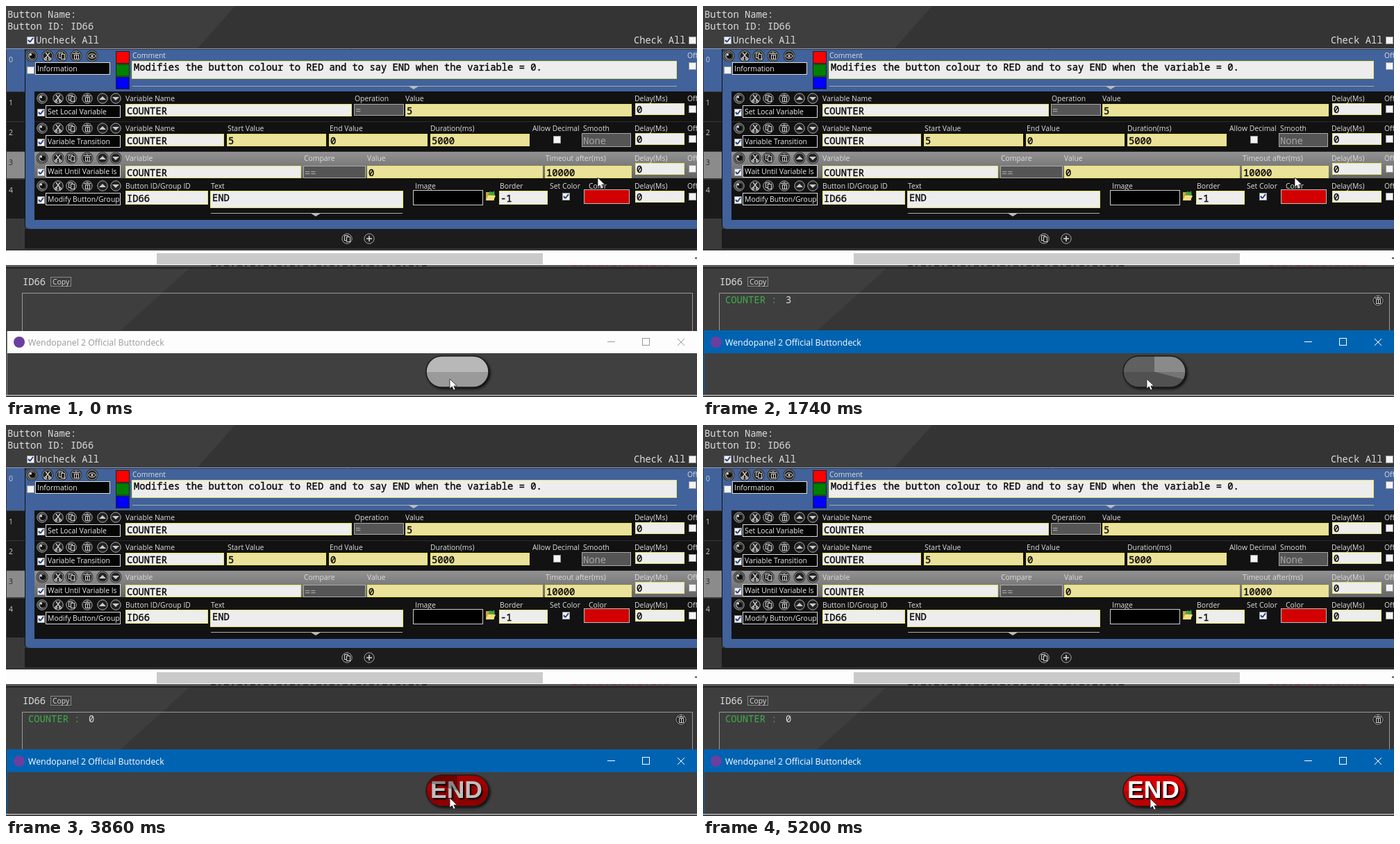
An HTML page with a canvas that plays this animation: 995x563 px, repeating every 5300 ms.

```html
<!DOCTYPE html>
<html lang="en">
<head>
<meta charset="utf-8">
<title>Counter button</title>
<style>
html, body { margin: 0; width: 100%; height: 100%; overflow: hidden; background: #3c3c3c; }
canvas { display: block; }
</style>
</head>
<body>
<canvas id="stage" width="995" height="563"></canvas>
<script>
const c = document.getElementById('stage').getContext('2d');
const LOOP = 5300, PRESS = 370, ZERO = 3700, SHRINK = 4430;
const MONO = '13.8px "Noto Sans Mono", monospace';
const SANS = '10.4px "Open Sans", sans-serif';
const WHITE = '#ededed', YELLOW = '#ebe29a', GREY = '#555';
const clamp = v => Math.max(0, Math.min(1, v));

function rect(x, y, w, h, fill, border) {
  c.fillStyle = fill;
  c.fillRect(x, y, w, h);
  if (border) {
    c.strokeStyle = border;
    c.lineWidth = 1;
    c.strokeRect(x + .5, y + .5, w - 1, h - 1);
  }
}

function poly(points, fill) {
  c.beginPath();
  for (let i = 0; i < points.length; i += 2) c.lineTo(points[i], points[i + 1]);
  c.closePath();
  c.fillStyle = fill;
  c.fill();
}

function disc(x, y, r, fill, border) {
  c.beginPath();
  c.arc(x, y, r, 0, 7);
  c.fillStyle = fill;
  c.fill();
  if (border) {
    c.strokeStyle = border;
    c.lineWidth = 1;
    c.stroke();
  }
}

function lines(color, width, ...segments) {
  c.strokeStyle = color;
  c.lineWidth = width;
  c.beginPath();
  for (const [x1, y1, x2, y2] of segments) {
    c.moveTo(x1, y1);
    c.lineTo(x2, y2);
  }
  c.stroke();
}

function text(s, x, y, font = SANS, color = '#ddd') {
  c.font = font;
  c.fillStyle = color;
  c.fillText(s, x, y);
}

// Dark text on light fields is slightly heavier than the labels.
function entry(s, x, y) {
  text(s, x, y, MONO, '#0a0a0a');
  c.strokeStyle = '#0a0a0a';
  c.lineWidth = .4;
  c.strokeText(s, x, y);
}

function field(x, y, right, bottom, fill, value = '') {
  const dim = fill === GREY, baseline = (y + bottom) / 2 + 5.5;
  rect(x, y, right - x, bottom - y, fill, dim ? '#aaa' : '#e6e36c');
  if (dim) text(value, x + 2, baseline, MONO, '#a5a5a5');
  else entry(value, x + 2, baseline);
}

function nameBox(s, x, y) {
  rect(x, y, 108, 18, '#050505', '#ddd');
  text(s, x + 3, y + 12.5, SANS, '#eee');
}

function check(x, y, on) {
  rect(x - 5, y - 5, 11, 11, '#f4f4f4', '#999');
  if (on) lines('#26418f', 2, [x - 3, y, x - .5, y + 3], [x - .5, y + 3, x + 4, y - 3]);
}

const glyphs = {
  dot() {
    disc(0, 0, 5.5, '#888');
    disc(1, 0, 4, '#111');
    disc(-1.5, -2, 1.5, '#eee');
  },
  cut() {
    lines('#ccc', 1.3, [-3, -5, 3, 3], [3, -5, -3, 3]);
    c.beginPath(); c.arc(-3, 4, 1.5, 0, 7); c.moveTo(4.5, 4); c.arc(3, 4, 1.5, 0, 7); c.stroke();
  },
  copy() {
    rect(-4, -5, 6, 8, '#222', '#ccc');
    rect(-1, -3, 6, 8, '#222', '#ccc');
  },
  bin() {
    rect(-3, -2, 7, 7, '#222', '#ccc');
    lines('#ccc', 1, [-5, -3.5, 5, -3.5], [-1.5, -5, 1.5, -5], [.5, -1, .5, 4]);
  },
  up() { poly([-5, 2, 0, -3, 5, 2], '#ccc'); },
  down() { poly([-5, -2, 0, 3, 5, -2], '#ccc'); },
  eye() {
    c.strokeStyle = '#ddd';
    c.beginPath(); c.ellipse(0, 0, 5, 3, 0, 0, 7); c.stroke();
    disc(0, 0, 1.5, '#ddd');
  },
  plus() { lines('#ddd', 1.5, [-4, 0, 4, 0], [0, -4, 0, 4]); }
};

function icon(kind, x, y) {
  c.save();
  c.translate(x, y);
  disc(0, 0, 8.5, '#151515');
  disc(0, 0, 7.2, '#222', '#aaa');
  glyphs[kind]();
  c.restore();
}

function cursor(x, y) {
  c.save();
  c.translate(x, y);
  poly([0, 0, 0, 14, 3.3, 11, 5.5, 16, 8, 15, 5.8, 10.2, 10.3, 10], '#fff');
  c.strokeStyle = '#222';
  c.lineWidth = .8;
  c.stroke();
  c.restore();
}

function handle(x, right, y) {
  lines('#aaa', 1, [x, y + .5, right, y + .5]);
  const mid = (x + right) / 2 + 13;
  poly([mid - 8, y, mid + 8, y, mid, y + 5], '#bbb');
}

function actionRow(name, y, boxY, labels, delayY) {
  ['dot', 'cut', 'copy', 'bin', 'up', 'down'].forEach((kind, i) =>
    icon(kind, [52, 75, 94, 117, 139, 158][i], y));
  check(50, boxY + 10, true);
  nameBox(name, 57, boxY);
  for (const [s, x] of [...labels, ['Delay(Ms)', 905], ['Off', 981]]) text(s, x, y + 4);
  field(906, delayY, 977, delayY + 17, WHITE, '0');
  check(988, delayY + 8);
}

function editor() {
  rect(0, 0, 995, 376, '#343434');
  poly([0, 0, 330, 0, 275, 62, 0, 62], '#3e3e3e');
  text('Button Name:', 2, 17, MONO);
  text('Button ID: ID66', 2, 34, MONO);
  check(35, 49, true);
  text('Uncheck All', 43, 54, MONO);
  text('Check All', 904, 54, MONO);
  check(988, 49);

  rect(0, 62, 27, 288, '#3a3a3a');
  const rows = [[62, 61, '#41629b'], [124, 42, '#1b1b1b'], [167, 42, '#1b1b1b'], [210, 38, '#8b8b8b'], [250, 56, '#1b1b1b']];
  rows.forEach(([y, h, fill], i) => {
    rect(1, y, 26, h, fill);
    text(i, 4, y + 18.5, SANS, i === 3 ? '#222' : '#ccc');
  });
  rect(27, 321, 968, 28, '#1c1c1c');
  c.fillStyle = '#41629b';
  c.beginPath();
  c.roundRect(27, 63, 990, 258, 8);
  c.fill();
  lines('#8b9dbb', 1, [0, 61.5, 995, 61.5]);
  lines('#111', 1, [27.5, 62, 27.5, 318]);
  rect(41, 123, 954, 185, '#121212');
  const band = c.createLinearGradient(0, 210, 0, 248);
  band.addColorStop(0, '#929292');
  band.addColorStop(1, '#656565');
  rect(41, 210, 954, 38, band);
  lines('#2b2b2b', 1, [41, 166.5, 995, 166.5], [41, 209.5, 995, 209.5]);

  ['dot', 'cut', 'copy', 'bin', 'eye'].forEach((kind, i) => icon(kind, [37, 60, 80, 101, 124][i], 72));
  check(35, 92);
  nameBox('Information', 42, 81);
  ['#f00', '#008000', '#00f'].forEach((color, i) => rect(158, 65 + i * 18.5, 20, 18, color, '#222'));
  text('Comment', 182, 75);
  text('Off', 981, 75);
  check(988, 86);
  field(181, 79, 966, 105, WHITE);
  entry('Modifies the button colour to RED and to say END when the variable = 0.', 184, 93);
  handle(182, 966, 115);

  actionRow('Set Local Variable', 133, 143, [['Variable Name', 172], ['Operation', 502], ['Value', 575]], 140);
  field(172, 141, 498, 159, WHITE, 'COUNTER');
  field(501, 141, 573, 158, GREY, '=');
  field(575, 141, 901, 159, YELLOW, '5');

  actionRow('Variable Transition', 176, 186, [['Variable Name', 172], ['Start Value', 319], ['End Value', 466],
    ['Duration(ms)', 611], ['Allow Decimal', 758], ['Smooth', 831]], 183);
  field(172, 184, 314, 202, WHITE, 'COUNTER');
  field(318, 184, 461, 202, YELLOW, '5');
  field(465, 184, 607, 202, YELLOW, '0');
  field(611, 184, 754, 202, YELLOW, '5000');
  check(793, 192);
  field(829, 183, 900, 203, GREY, 'None');

  actionRow('Wait Until Variable Is', 219, 229, [['Variable', 172], ['Compare', 429], ['Value', 520],
    ['Timeout after(ms)', 777]], 226);
  field(172, 230, 425, 248, WHITE, 'COUNTER');
  field(428, 230, 518, 248, GREY, '==');
  field(520, 230, 773, 248, YELLOW, '0');
  field(776, 230, 901, 248, YELLOW, '10000');

  actionRow('Modify Button/Group', 259, 269, [['Button ID/Group ID', 172], ['Text', 295], ['Image', 589],
    ['Border', 711], ['Set Color', 783], ['Color', 839]], 266);
  field(172, 266, 291, 286, WHITE, 'ID66');
  field(294, 266, 572, 291, WHITE);
  entry('END', 297, 281);
  rect(586, 265, 101, 22, '#000', '#ccc');
  poly([691, 268, 696, 268, 698, 270, 703, 270, 703, 280, 691, 280], '#c8a83c');
  poly([694, 273, 705, 273, 702, 280, 691, 280], '#f1e07a');
  poly([694, 272, 697, 267, 701, 268, 703, 266, 704, 273, 698, 272], '#43a047');
  field(710, 266, 780, 286, WHITE, '-1');
  check(806, 274, true);
  rect(832, 264, 66, 21, '#d20000', '#bbb');
  handle(295, 571, 298);

  icon('copy', 491, 335);
  icon('plus', 523, 335);
  rect(0, 352, 995, 21, '#fdfdfd');
  rect(217, 356, 556, 16, '#cacaca');
  rect(992, 362, 3, 2, '#555');
}

function variables(t) {
  rect(0, 373, 995, 190, '#363636');
  poly([0, 378, 264, 378, 165, 467, 0, 467], '#3e3e3e');
  rect(0, 373, 995, 3, '#555');
  c.setLineDash([7, 4, 3, 5]);
  lines('#262626', 2, [295, 374, 610, 374]);
  lines('#6b3848', 2, [815, 374, 955, 374]);
  c.setLineDash([]);
  rect(0, 376, 995, 2, '#222');
  text('ID66', 24, 402, MONO);
  rect(64, 390, 30, 14, '#3c3c3c', '#888');
  text('Copy', 67, 401);
  rect(23, 413, 966, 60, 'transparent', '#999');
  if (t >= PRESS) {
    const value = Math.ceil(5 * clamp((ZERO - t) / (ZERO - PRESS)));
    text('COUNTER :', 32, 428, MONO, '#3fae49');
    text(value, 119, 428, MONO, '#ddd');
    icon('bin', 972, 424);
  }
}

function buttonShape() {
  c.beginPath();
  c.roundRect(605, 504, 90, 45, 22.5);
}

function deckButton(t) {
  const ended = t >= ZERO;
  c.save();
  c.shadowColor = '#000';
  c.shadowBlur = 4;
  c.shadowOffsetX = c.shadowOffsetY = 2;
  buttonShape();
  c.fillStyle = '#222';
  c.fill();
  c.restore();

  c.save();
  buttonShape();
  c.clip();
  rect(605, 504, 90, 23, ended ? '#d80000' : '#b8b8b8');
  rect(605, 527, 90, 23, ended ? '#bd0000' : '#9a9a9a');
  if (ended) {
    c.save();
    c.shadowColor = '#000';
    c.shadowBlur = 2;
    c.shadowOffsetX = c.shadowOffsetY = 2;
    text('END', 611, 537, 'bold 35.5px "Liberation Sans", Arial, sans-serif', '#fff');
    c.restore();
  }
  if (t >= PRESS && t < SHRINK + 150) {
    // Cooldown shade: a sweeping dark wedge that finally collapses to the centre.
    const size = 1 - clamp((t - SHRINK) / 150);
    const swept = clamp((t - PRESS) / 4200) * Math.PI * 2;
    c.translate(650, 526.5);
    c.scale(46 * size, 23 * size);
    const radius = size < 1 ? 1 : 1.5;
    disc(0, 0, radius, 'rgba(0,0,0,.25)');
    c.fillStyle = 'rgba(0,0,0,.3)';
    c.beginPath();
    c.moveTo(0, 0);
    c.arc(0, 0, radius, swept - Math.PI / 2, Math.PI * 1.5);
    c.fill();
  }
  c.restore();
  buttonShape();
  c.strokeStyle = '#1d1d1d';
  c.lineWidth = 1.5;
  c.stroke();
}

function deckWindow(t) {
  const active = t >= PRESS, ink = active ? '#fff' : '#999';
  const top = active ? 467 : 468;
  rect(1, top, 994, 96, active ? '#0063b1' : '#888');
  rect(2, top, 993, 500 - top, active ? '#0063b1' : '#fdfdfd');
  rect(2, 500, 993, 60, '#404040');
  rect(0, 560, 995, 1, '#ddd');
  rect(0, 561, 995, 2, '#444');
  disc(19, 484, 8, '#6b3fa0');
  text('Wendopanel 2 Official Buttondeck', 32, 488.5, '12.35px "Open Sans", sans-serif', ink);
  lines(ink, 1, [866, 483.5, 877, 483.5], [967, 479, 977, 489], [977, 479, 967, 489]);
  c.strokeRect(916.5, 478.5, 10, 10);
  deckButton(t);
  const nudge = clamp((t - 5000) / 180);
  cursor(639 + 5 * nudge, 537 + nudge);
}

function frame(now) {
  const t = now % LOOP;
  editor();
  const leave = clamp((t - 3220) / 200), exit = clamp((t - 3420) / 120);
  cursor(852 - 25 * leave - 6 * exit, 247 + 103 * leave + 30 * exit);
  variables(t);
  deckWindow(t);
  requestAnimationFrame(frame);
}
requestAnimationFrame(frame);
</script>
</body>
</html>
```
